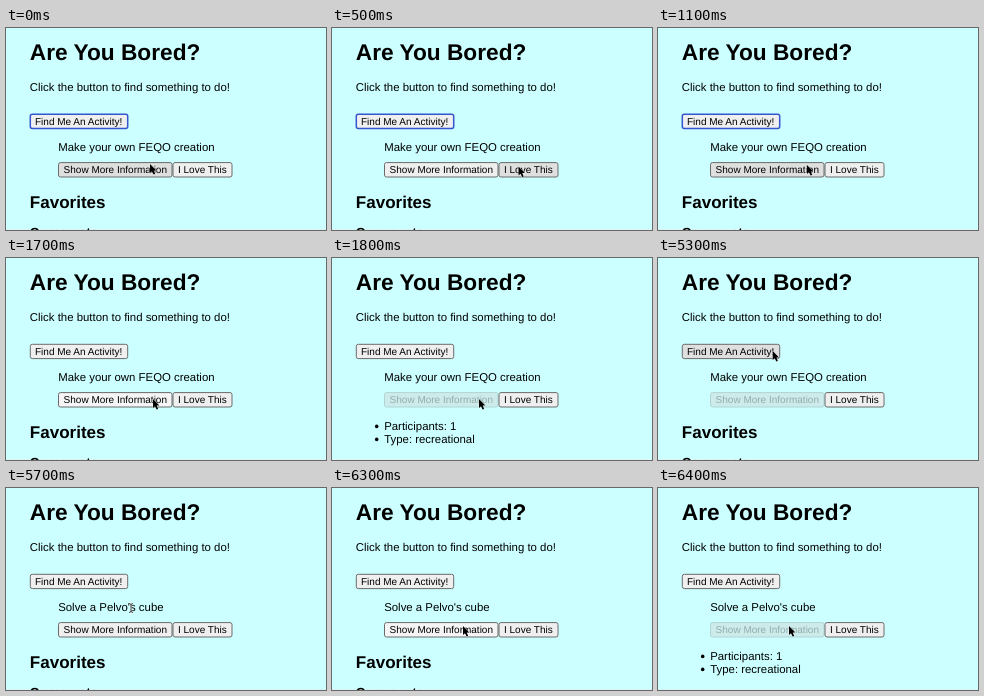
Write an HTML page that moves like this. It is 320 px wide and 202 px high and loops after 8000 ms.

```html
<!DOCTYPE html>
<html lang="en">
<head>
<meta charset="utf-8">
<title>Are You Bored?</title>
<style>
  html, body { margin: 0; width: 100%; height: 100%; overflow: hidden; background: #cff; }
  svg {
    display: block; width: 100vw; height: 100vh; cursor: default;
    font: 11.4px "Liberation Sans", Arial, sans-serif;
    text-rendering: geometricPrecision;
  }
  #page { filter: blur(.35px); }
  .title { font-size: 22.7px; font-weight: bold; }
  .heading { font-size: 17.05px; font-weight: bold; }
  .subheading { font-size: 13.2px; font-weight: bold; }
  .button text { font-size: 10px; }
  .button rect { fill: #efefef; stroke: #6b6b6b; stroke-width: 1; }
  .hover rect { fill: #dfdfdf; }
  .active rect { fill: #f5f5f5; }
  .focus rect { stroke: #3455cf; stroke-width: 1.5; }
  .disabled rect { fill: #cdebeb; stroke: #b0d4d4; }
  .disabled text { fill: #94acac; }
</style>
</head>
<body>
<svg viewBox="0 0 320 202" preserveAspectRatio="none">
  <rect width="320" height="202" fill="#cff"/>
  <rect y="201" width="320" height="1" fill="#dcf4f4"/>
  <g id="page">
    <text class="title" x="23.8" y="32.2">Are You Bored?</text>
    <text x="23.8" y="63.2">Click the button to find something to do!</text>
    <g class="button" id="find">
      <rect x="24.3" y="86.3" width="97.4" height="14.3" rx="2"/>
      <text x="29" y="97.1">Find Me An Activity!</text>
    </g>
    <text id="activity" x="52.2" y="123.1"></text>
    <g class="button" id="more">
      <rect x="52.5" y="134.6" width="113.5" height="14.4" rx="2"/>
      <text x="57.6" y="145.4">Show More Information</text>
    </g>
    <g class="button" id="love">
      <rect x="167" y="134.6" width="59" height="14.4" rx="2"/>
      <text x="172" y="145.4">I Love This</text>
    </g>
    <g id="favorites">
      <text class="heading" x="23.8" y="179.6">Favorites</text>
      <text class="subheading" x="23.8" y="208.5">Comments</text>
    </g>
    <g id="details">
      <circle cx="44.7" cy="168.4" r="1.8"/>
      <text x="52.2" y="172.1">Participants: 1</text>
      <circle cx="44.7" cy="181.4" r="1.8"/>
      <text x="52.2" y="185.2">Type: recreational</text>
    </g>
    <path id="arrow" d="M0 0V9L2 7.3L3.6 10.6L5.2 9.9L3.7 6.6H6.4Z" stroke="#fff" stroke-opacity=".7" stroke-width=".8" paint-order="stroke"/>
    <g id="beam" fill="none">
      <path d="M-2-4.5Q0-4.5 0-3Q0-4.5 2-4.5M0-3V3M-2 4.5Q0 4.5 0 3Q0 4.5 2 4.5" stroke="#fff" stroke-opacity=".7" stroke-width="2"/>
      <path d="M-2-4.5Q0-4.5 0-3Q0-4.5 2-4.5M0-3V3M-2 4.5Q0 4.5 0 3Q0 4.5 2 4.5" stroke="#333" stroke-width=".9"/>
    </g>
  </g>
</svg>
<script>
const LOOP = 8000;
const STEP = 100;

// Pointer stops: time in ms, x, y
const pointerPath = [
  [0, 144, 136], [600, 195, 139], [700, 195, 139],
  [1100, 149, 137], [1500, 147, 141], [4400, 147, 141],
  [4500, 142, 131], [4600, 142, 131], [5100, 114.7, 93],
  [5500, 114.7, 93], [5700, 125, 120], [6000, 131, 138], [LOOP, 131, 138]
];

const byId = id => document.getElementById(id);
const [find, more, love, activity, favorites, details, arrow, beam] =
  ["find", "more", "love", "activity", "favorites", "details", "arrow", "beam"].map(byId);

const between = (t, start, end) => t >= start && t < end;
const show = (node, visible) => node.setAttribute("visibility", visible ? "visible" : "hidden");

function pointerAt(t) {
  const i = pointerPath.findIndex(stop => stop[0] > t);
  const [t0, x0, y0] = pointerPath[i - 1];
  const [t1, x1, y1] = pointerPath[i];
  const k = (t - t0) / (t1 - t0);
  return { x: x0 + (x1 - x0) * k, y: y0 + (y1 - y0) * k };
}

function isOver(node, { x, y }) {
  const box = node.getBBox();
  return between(x, box.x, box.x + box.width) && between(y, box.y, box.y + box.height);
}

function setButton(button, pointer, states = {}) {
  const all = { hover: isOver(button, pointer), ...states };
  for (const name of ["hover", "active", "focus", "disabled"]) {
    button.classList.toggle(name, Boolean(all[name]));
  }
}

function render(t) {
  const pointer = pointerAt(t);
  const listed = between(t, 1800, 5300) || t >= 6400;

  activity.textContent = t < 5400 ? "Make your own FEQO creation" : "Solve a Pelvo's cube";
  show(details, listed);
  show(favorites, !listed);

  setButton(find, pointer, { focus: t < 1700, active: between(t, 5200, 5300) });
  setButton(more, pointer, {
    active: between(t, 1700, 1800) || between(t, 6300, 6400),
    disabled: between(t, 1800, 5400) || t >= 6400
  });
  setButton(love, pointer);

  const overText = isOver(activity, pointer);
  const move = `translate(${pointer.x} ${pointer.y})`;
  arrow.setAttribute("transform", move);
  beam.setAttribute("transform", move);
  show(arrow, !overText);
  show(beam, overText);
}

const start = performance.now();
function tick() {
  const elapsed = (performance.now() - start) % LOOP;
  render(Math.floor(elapsed / STEP) * STEP);
  requestAnimationFrame(tick);
}
tick();
</script>
</body>
</html>
```
